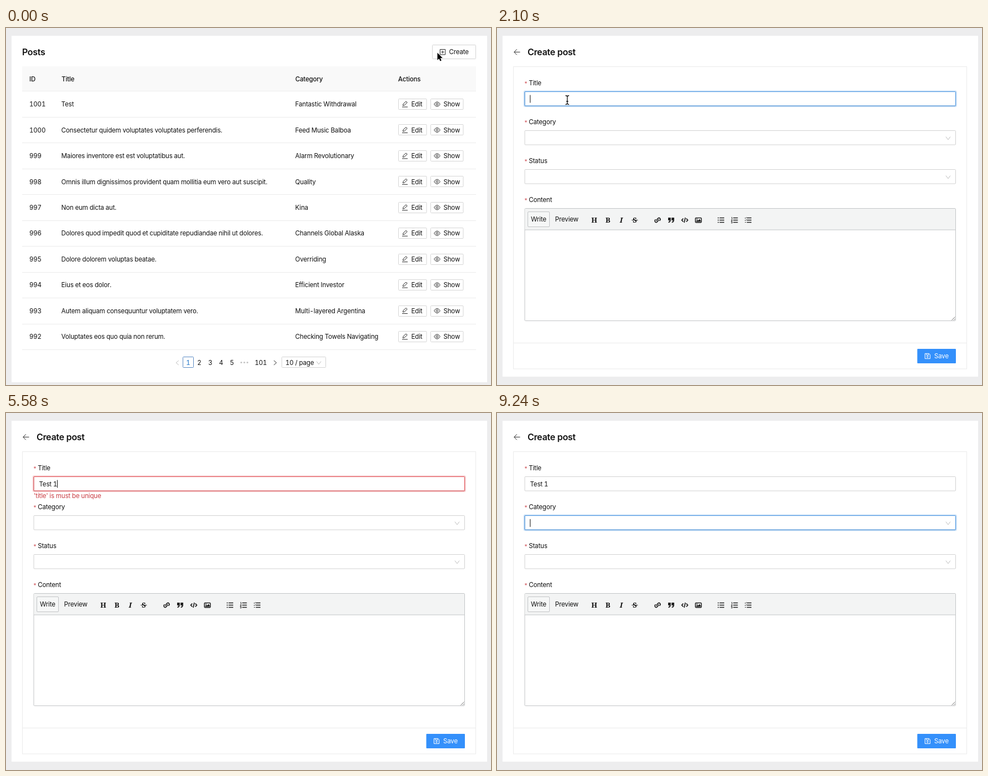
An HTML page for the animation above (9.3 s loop, 873 by 642 pixels).

```html
<!DOCTYPE html>
<html lang="en">
<head>
<meta charset="utf-8">
<title>Posts</title>
<style>
html, body { margin: 0; width: 100%; height: 100%; overflow: hidden; background: #ededee; }
svg { display: block; width: 873px; height: 642px; }
text { font: 400 11.5px Inter, sans-serif; letter-spacing: -.0135em; font-feature-settings: "tnum"; fill: #111; white-space: pre; }
.medium { font-weight: 500; }
.heading { font-size: 16px; font-weight: 600; letter-spacing: -.021em; }
.middle { text-anchor: middle; }
.white { fill: #fff; }
.red { fill: #c8383f; }
.blue { fill: #3c86d0; }
.star { font-family: "Liberation Sans", sans-serif; }
.serif { font: 700 13px "Noto Serif", serif; letter-spacing: 0; }
.italic { font-style: italic; }
.icon { fill: none; stroke: #2a2a2a; stroke-width: 1; }
.icon.gray { fill: none; stroke: #bdbdbd; }
.icon.white { fill: none; stroke: #fff; }
.icon.bold { stroke: #222; stroke-width: 1.7; }
</style>
</head>
<body>
<svg id="stage" viewBox="0 0 873 642"></svg>
<script>
const LOOP = 9300, BLINK = 450;
const NAVIGATE = 1080, FOCUS_TITLE = 1995, FOCUS_CATEGORY = 6264;
const ERROR_IN = 4060, ERROR_OUT = 5560, HIDE_POINTER = 3595, SHOW_POINTER = 7140;
const KEYS = [[3600, 'T'], [3715, 'e'], [3830, 's'], [3945, 't'], [5340, ' '], [5480, '1']];
const POINTER = [[0, 776.5, 44.5], [60, 776.5, 44.5], [240, 792.5, 41.5], [1740, 792.5, 41.5],
  [1960, 126.5, 129.5], [SHOW_POINTER, 126.5, 129.5], [7500, 133, 466], [7720, 140, 665]];
const FIELD_TOPS = [114.5, 184.5, 254.5];

const POSTS = [
  ['Test', 'Fantastic Withdrawal'],
  ['Consectetur quidem voluptates voluptates perferendis.', 'Feed Music Balboa'],
  ['Maiores inventore est est voluptatibus aut.', 'Alarm Revolutionary'],
  ['Omnis illum dignissimos provident quam mollitia eum vero aut suscipit.', 'Quality'],
  ['Non eum dicta aut.', 'Kina'],
  ['Dolores quod impedit quod et cupiditate repudiandae nihil ut dolores.', 'Channels Global Alaska'],
  ['Dolore dolorem voluptas beatae.', 'Overriding'],
  ['Eius et eos dolor.', 'Efficient Investor'],
  ['Autem aliquam consequuntur voluptatem vero.', 'Multi-layered Argentina'],
  ['Voluptates eos quo quia non rerum.', 'Checking Towels Navigating']
];

const ICONS = {
  edit: 'M-5 5H5M-3.6 2.4L-3-.4L2-5L4.2-2.9L-.9 1.9Z',
  eye: 'M-5.4 0Q0-8.4 5.4 0Q0 8.4-5.4 0ZM-1.8 0a1.8 1.8 0 1 0 3.6 0a1.8 1.8 0 1 0-3.6 0',
  plus: 'M-4.7-4.7H4.7V4.7H-4.7ZM-2.6 0H2.6M0-2.6V2.6',
  down: 'M-4-2.5L0 2.8L4-2.5',
  left: 'M2.3-4L-2.3 0L2.3 4',
  right: 'M-2.3-4L2.3 0L-2.3 4',
  back: 'M5.5 0H-5M-.3-5L-5.2 0L-.3 5',
  save: 'M-4.6-4.6H2.6L4.6-2.6V4.6H-4.6ZM-2-4.4V-1.8H2V-4.4M-1.4 1.3a1.4 1.4 0 1 0 2.8 0a1.4 1.4 0 1 0-2.8 0',
  link: 'M-1.3 1.5A2.5 2.5 0 0 1-1-1.3L1.2-3.6A2.5 2.5 0 0 1 4.6-.1L3.3 1.2M1.3-1.5A2.5 2.5 0 0 1 1 1.3L-1.2 3.6A2.5 2.5 0 0 1-4.6 .1L-3.3-1.2',
  code: 'M-2.7-2.8L-5.4 0L-2.7 2.8M2.7-2.8L5.4 0L2.7 2.8M1-4.5L-1 4.5',
  lines: 'M-2.3-4H6M-2.3 0H6M-2.3 4H6',
  bullets: 'M-5.7-4h2M-5.7 0h2M-5.7 4h2',
  numbers: 'M-5.5-5h1v3.5M-6-.5h1.7v1.3l-1.7 1h2M-6 3.3h1.8v2h-1.8',
  checks: 'M-6-4l1 1l2-2.2M-6 0l1 1l2-2.2M-5.6 4h1.8'
};

const text = (x, middle, value, cls = '', id = '') =>
  `<text x="${x}" y="${middle + (cls.includes('heading') ? 5.8 : 4.2)}" class="${cls}" id="${id}">${value}</text>`;
const box = (x, y, w, h, fill = '#fff', stroke = 'none', extra = '') =>
  `<rect x="${x}" y="${y}" width="${w}" height="${h}" fill="${fill}" stroke="${stroke}" ${extra}/>`;
const icon = (name, x, y, cls = '') =>
  `<path class="icon ${cls}" transform="translate(${x} ${y})" d="${ICONS[name]}"/>`;
const line = (x1, x2, y, color) => `<path d="M${x1} ${y}H${x2}" stroke="${color}"/>`;

function listPage() {
  let out = box(10, 14, 856, 623) + text(29, 43.5, 'Posts', 'heading')
    + box(767.5, 30.5, 78, 25, '#fff', '#d4d4d4', 'rx="1"')
    + box(767.5, 30.5, 78, 25, 'none', '#8db9d3', 'rx="1" id="createHover"')
    + icon('plus', 786, 43.2) + text(797.5, 43.2, 'Create')
    + box(29, 69, 817, 44.5, '#f9f9f9') + line(29, 846, 113.5, '#eee');
  [['ID', 42], ['Title', 100], ['Category', 520.7], ['Actions', 705.8]]
    .forEach(([label, x]) => out += text(x, 91.3, label, 'medium'));
  POSTS.forEach(([title, category], i) => {
    const y = 137 + i * 46.44, top = Math.round(y - 10) + .5;
    out += text(42, y, 1001 - i) + text(99.6, y, title) + text(520.6, y, category)
      + box(706.5, top, 50.5, 19, '#fff', '#d6d6d6', 'rx="1"') + icon('edit', 718, y) + text(729.5, y, 'Edit')
      + box(764.5, top, 58.5, 19, '#fff', '#d6d6d6', 'rx="1"') + icon('eye', 776, y) + text(787.5, y, 'Show')
      + line(29, 846, Math.round(y + 23) + .5, '#ebebeb');
  });
  out += icon('left', 308.5, 602, 'gray') + box(318.5, 591.5, 19, 19, '#fff', '#5b8bc4', 'rx="1"')
    + text(328, 601.5, 1, 'middle medium blue');
  [2, 3, 4, 5].forEach((n, i) => out += text(348 + i * 19.55, 601.5, n, 'middle'));
  [423.5, 429, 434.5].forEach(x => out += `<circle cx="${x}" cy="601.5" r="1.6" fill="#c4c4c4"/>`);
  return out + text(458.7, 601.5, 101, 'middle') + icon('right', 484.5, 602)
    + box(496.5, 591.5, 79, 19, '#fff', '#d4d4d4', 'rx="1"') + text(503, 601.5, '10 / page')
    + icon('down', 563, 602, 'gray');
}

// A colored border with a soft ring around it, faded in and out over a plain field.
const ring = (id, top, color) => `<g id="${id}">`
  + box(49, top - 1, 777.5, 27.5, 'none', color, 'stroke-width="2.6" stroke-opacity=".25" rx="2"')
  + box(50, top, 775.5, 25.5, 'none', color, 'rx="1"') + '</g>';

function toolbar() {
  let out = box(50, 324.5, 775.5, 202, '#fff', '#c3c5c7', 'rx="1.5"')
    + box(50.5, 325, 774.5, 38, '#f3f4f4') + line(50, 825.5, 363, '#c3c5c7')
    + box(55.5, 330.5, 39, 27, '#f6f7f7', '#c3c5c7', 'rx="1.5"')
    + text(61, 344, 'Write') + text(104.6, 344, 'Preview');
  [['H', 175], ['B', 199.5], ['I', 223.7, 'italic'], ['S', 248]].forEach(([letter, x, cls = '']) =>
    out += text(x, 345.8, letter, `serif middle ${cls}`));
  out += line(242.5, 253.5, 345.5, '#222')
    + icon('link', 289, 345.5, 'bold') + icon('code', 338, 345.5, 'bold');
  [308, 314.2].forEach(x => out +=
    `<path d="M${x} 341h4.8v4.3q0 4.7-4.3 4.9v-1.6q2-.3 2-2.7h-2.5z" fill="#222"/>`);
  out += box(357.2, 341.5, 10.6, 8.2, 'none', '#222', 'stroke-width="1.5" rx="1"')
    + `<path d="M358.5 348.6v-1.6l2-2l1.4 1.3l2.5-2.7l2.2 2.5v2.5z" fill="#222"/><circle cx="360" cy="343.8" r="1" fill="#222"/>`;
  [403, 427.5, 452].forEach(x => out += icon('lines', x, 345.5, 'bold'));
  return out + icon('bullets', 403, 345.5, 'bold') + icon('numbers', 427.5, 345.5) + icon('checks', 452, 345.5)
    + '<path d="M818.5 525.5l6-6M822 525.5l2.5-2.5" stroke="#777"/>';
}

function formPage() {
  let out = box(10, 14, 856, 613) + icon('back', 36, 43.3) + text(55, 43.5, 'Create post', 'heading')
    + box(29.5, 69.5, 816, 543.5, '#fff', '#ebebeb') + line(29.5, 845.5, 566.5, '#ebebeb');
  ['Title', 'Category', 'Status', 'Content'].forEach((label, i) =>
    out += text(49.8, 99.6 + i * 70, '*', 'red star') + text(57.2, 99 + i * 70, label));
  FIELD_TOPS.forEach((top, i) => {
    out += box(50, top, 775.5, 25.5, '#fff', '#d2d2d2', 'rx="1"');
    if (i) out += icon('down', 812, top + 13.5, 'gray');
  });
  return out + ring('titleFocus', 114.5, '#3f8fe0') + ring('titleError', 114.5, '#e0444a')
    + ring('categoryFocus', 184.5, '#3f8fe0')
    + text(59.5, 127.3, '', '', 'typed') + text(50, 149.2, "'title' is must be unique", 'red', 'error')
    + box(0, 0, 1.1, 14, '#222', 'none', 'id="caret"') + toolbar()
    + box(756.5, 577, 69.5, 26, '#3490fb', 'none', 'rx="1"') + icon('save', 775, 590, 'white')
    + text(787, 590, 'Save', 'white');
}

const BEAM = 'M-3.2-8Q0-8 0-5.5Q0-8 3.2-8M0-6V6M-3.2 8Q0 8 0 5.5Q0 8 3.2 8M-1.8 2.5H1.8';
document.getElementById('stage').innerHTML =
  `<g id="list">${listPage()}</g><g id="form">${formPage()}</g>
  <path id="arrow" d="M0 0V13.2L3 10.4L5 15L7.3 14L5.3 9.6H9.4Z" stroke="#fff" stroke-width="1" paint-order="stroke"/>
  <g id="beam" fill="none"><path d="${BEAM}" stroke="#fff" stroke-width="3"/>
  <path d="${BEAM}" stroke="#111" stroke-width="1.3"/></g>`;

const part = id => document.getElementById(id);
const show = (id, visible) => part(id).style.display = visible ? '' : 'none';
const fade = (id, amount) => part(id).style.opacity = amount;
const smooth = p => p * p * (3 - 2 * p);
const ramp = (t, start, length = 240) => smooth(Math.min(1, Math.max(0, (t - start) / length)));

function pointerAt(t) {
  const next = POINTER.findIndex(key => key[0] > t);
  if (next < 0) return POINTER.at(-1).slice(1);
  const [t0, x0, y0] = POINTER[next - 1], [t1, x1, y1] = POINTER[next];
  const p = ramp(t, t0, t1 - t0);
  return [x0 + (x1 - x0) * p, y0 + (y1 - y0) * p];
}

function drawPointer(t) {
  const [x, y] = pointerAt(t);
  const visible = t < HIDE_POINTER || t >= SHOW_POINTER;
  const overField = FIELD_TOPS.some(top => y > top && y < top + 26) || (y > 363 && y < 527);
  const beam = t >= NAVIGATE && x > 50 && x < 826 && overField;
  show('arrow', visible && !beam);
  show('beam', visible && beam);
  part(beam ? 'beam' : 'arrow').setAttribute('transform', `translate(${x} ${y})`);
}

function drawForm(t) {
  const pressed = KEYS.filter(key => key[0] <= t);
  const typed = part('typed');
  typed.textContent = pressed.map(key => key[1]).join('');

  const error = ramp(t, ERROR_IN) - ramp(t, ERROR_OUT);
  fade('error', error);
  fade('titleError', error);
  fade('titleFocus', (ramp(t, FOCUS_TITLE - 60, 180) - ramp(t, FOCUS_CATEGORY)) * (1 - error));
  fade('categoryFocus', ramp(t, FOCUS_CATEGORY));

  const inCategory = t >= FOCUS_CATEGORY;
  const since = inCategory ? FOCUS_CATEGORY : pressed.length ? pressed.at(-1)[0] : FOCUS_TITLE;
  show('caret', t >= since && Math.floor((t - since) / BLINK) % 2 === 0);
  const width = inCategory || !pressed.length ? 0 : typed.getComputedTextLength();
  part('caret').setAttribute('x', 59.2 + width);
  part('caret').setAttribute('y', inCategory ? 190.8 : 120.5);
}

function draw(now) {
  const t = now % LOOP;
  show('list', t < NAVIGATE);
  show('form', t >= NAVIGATE);
  fade('createHover', ramp(t, 60));
  drawForm(t);
  drawPointer(t);
}

const start = performance.now();
function tick() {
  draw(performance.now() - start);
  requestAnimationFrame(tick);
}
tick();
</script>
</body>
</html>
```
